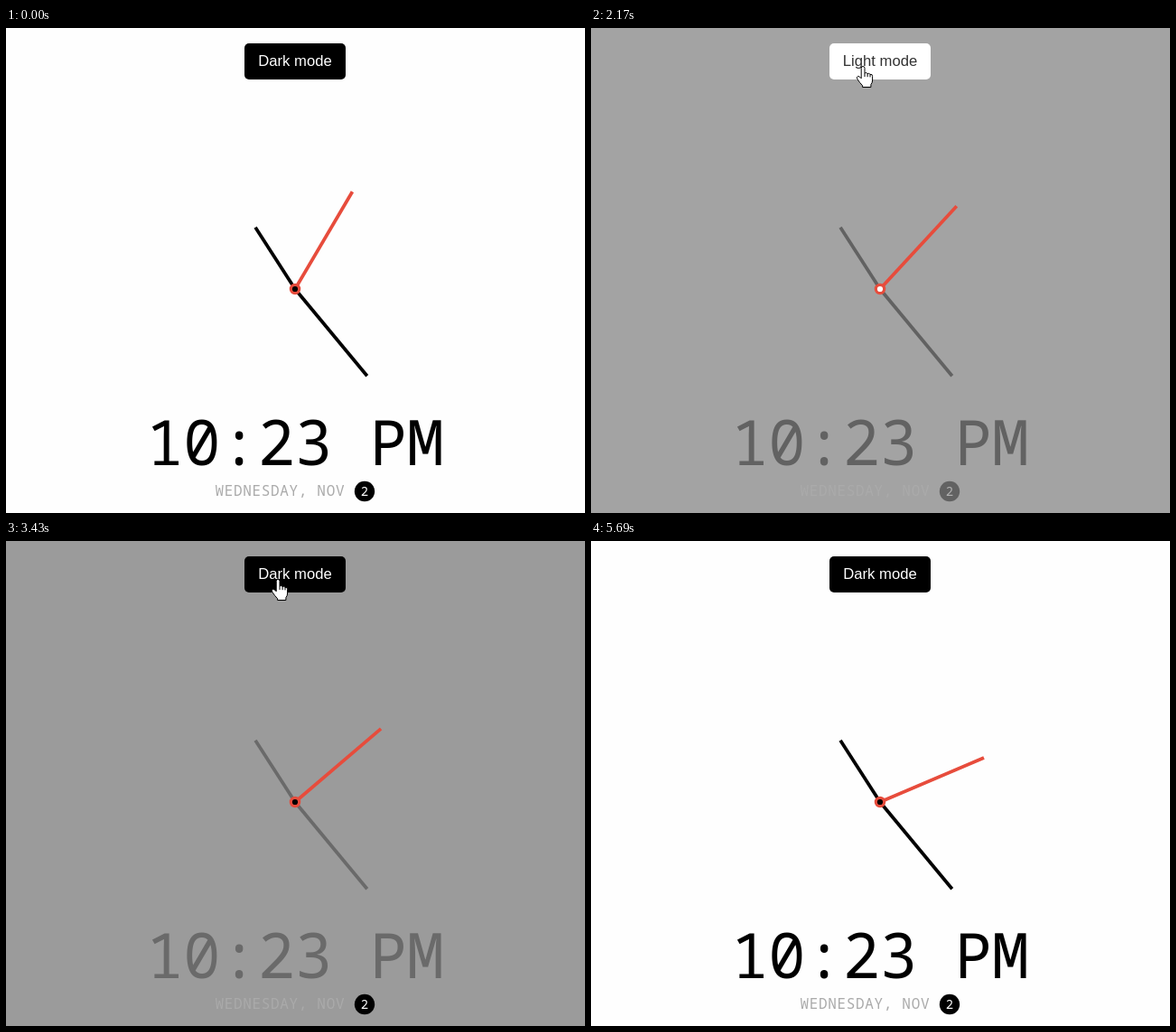
Write an HTML page that moves like this. It is 641 px wide and 537 px high and loops after 5.79 s.

```html
<!DOCTYPE html>
<html lang="en">
<head>
<meta charset="utf-8">
<title>Clock</title>
<style>
  html, body { margin: 0; width: 100%; height: 100%; overflow: hidden; background: #fefefe; }
  svg { display: block; width: 100%; height: 100%; }
  text { text-anchor: middle; }
  .mono { font-family: "Noto Sans Mono", monospace; }
</style>
</head>
<body>
<svg viewBox="0 0 641 537">
  <rect id="page" width="641" height="537"/>
  <rect id="button" x="264" y="17" width="112" height="40" rx="5"/>
  <text id="label" x="320" y="42" font-size="16.67" font-family="'Liberation Sans', Arial, sans-serif"></text>

  <g transform="translate(320 289)">
    <g id="hands">
      <rect id="hour" x="-1.875" y="-81.25" width="3.75" height="81.25"/>
      <rect id="minute" x="-1.875" y="-125" width="3.75" height="125"/>
    </g>
    <rect id="second" x="-1.875" y="-125" width="3.75" height="125" fill="#e74c3c"/>
    <circle r="6.25" fill="#e74c3c"/>
    <circle id="pin" r="3.1"/>
  </g>

  <text id="time" class="mono" x="320" y="484" font-size="68.7">10:23 PM</text>
  <text class="mono" x="231.4" y="518" font-size="16" letter-spacing=".67" fill="#aaa" style="text-anchor:start">WEDNESDAY, NOV</text>
  <circle id="badge" cx="397" cy="513" r="11.2"/>
  <text id="day" class="mono" x="397" y="518" font-size="14">2</text>

  <g id="cursor" fill="#fff" stroke="#000" stroke-width="1" stroke-linejoin="round">
    <path id="arrow" d="M.5 .5V16.5L4.2 13L6.6 18.5L9 17.5L6.6 12H11.5Z"/>
    <g id="pointer">
      <path d="M-2.8 2.4a1.9 1.9 0 0 1 3.8 0V8q1.8 -1.4 3.1 .6q1.8 -1 2.9 .8q2.6 -.8 2.6 2V16q0 2.6 -1.7 4.6V23.5H-1.4V21.8Q-4.6 18.6 -7.2 14.4Q-8.4 12 -6.4 11.4Q-4.8 11.2 -2.8 13.8Z"/>
      <path d="M1 8v4M4.1 8.8v3.4M7 9.6v2.8" fill="none"/>
    </g>
  </g>
</svg>
<script>
const LOOP = 5790, FADE = 500;
const DARK_AT = 1890, LIGHT_AT = 3070;
const TICKS = [400, 1350, 2315, 3290, 4265, 5200];
const STEP = 360 / 59;

// time, x, y of the cursor's hot spot
const PATH = [
  [1000, 634, 104], [1030, 600, 98], [1090, 470, 78], [1150, 360, 62], [1210, 294, 54],
  [1360, 294, 54], [1450, 302, 42], [3580, 302, 42], [3640, 360, 112], [3790, 455, 190],
  [3950, 455, 190], [4110, 586, 366], [4230, 586, 366], [4350, 623, 520], [4380, 630, 540]
];

const el = id => document.getElementById(id);
const fill = (id, color) => el(id).setAttribute('fill', color);
const turn = (id, deg) => el(id).setAttribute('transform', `rotate(${deg})`);
const show = (id, on) => el(id).setAttribute('visibility', on ? 'visible' : 'hidden');
const mix = (a, b, p) => a + (b - a) * p;
const gray = (a, b, p) => {
  const v = Math.round(mix(a, b, p));
  return `rgb(${v},${v},${v})`;
};

// cubic-bezier(.42, 0, 1, 1)
function easeIn(x) {
  if (x <= 0) return 0;
  if (x >= 1) return 1;
  let lo = 0, hi = 1;
  for (let i = 0; i < 24; i++) {
    const s = (lo + hi) / 2;
    const at = 1.26 * s * (1 - s) ** 2 + 3 * s * s * (1 - s) + s ** 3;
    if (at < x) lo = s; else hi = s;
  }
  return lo * lo * (3 - 2 * lo);
}

function darkness(t) {
  if (t < DARK_AT + 90) return 0;
  if (t < LIGHT_AT) return easeIn((t - DARK_AT) / FADE);
  return 1 - easeIn((t - LIGHT_AT) / FADE);
}

// each tick rebuilds the date, which ends the badge's fade early
function badgeDarkness(t, dark) {
  if (t >= TICKS[3]) return 0;
  return t >= TICKS[2] && t < LIGHT_AT ? 1 : dark;
}

function drawCursor(t) {
  const next = PATH.findIndex(k => k[0] > t);
  const seen = next > 0;
  let over = false;
  if (seen) {
    const a = PATH[next - 1], b = PATH[next];
    const p = (t - a[0]) / (b[0] - a[0]);
    const x = mix(a[1], b[1], p), y = mix(a[2], b[2], p);
    over = x > 264 && x < 376 && y > 17 && y < 57;
    el('cursor').setAttribute('transform', `translate(${x} ${y})`);
  }
  show('arrow', seen && !over);
  show('pointer', seen && over);
}

function draw(t) {
  const isDark = t >= DARK_AT && t < LIGHT_AT;
  const dark = darkness(t), badge = badgeDarkness(t, dark);
  const ink = gray(0, 255, dark);

  fill('page', gray(254, 17, dark));
  fill('hands', ink);
  fill('time', ink);
  fill('badge', gray(0, 255, badge));
  fill('day', gray(255, 51, badge));
  fill('button', isDark ? '#fff' : '#000');
  fill('label', isDark ? '#333' : '#fff');
  fill('pin', isDark ? '#fff' : '#000');
  el('label').textContent = isDark ? 'Light mode' : 'Dark mode';

  const seconds = TICKS.reduce((sum, at) => sum + easeIn((t - at) / FADE), 5);
  turn('second', seconds * STEP);
  drawCursor(t);
}

turn('hour', 10 / 11 * 360);
turn('minute', 23 * STEP);

const start = performance.now();
function frame() {
  draw((performance.now() - start) % LOOP);
  requestAnimationFrame(frame);
}
frame();
</script>
</body>
</html>
```
